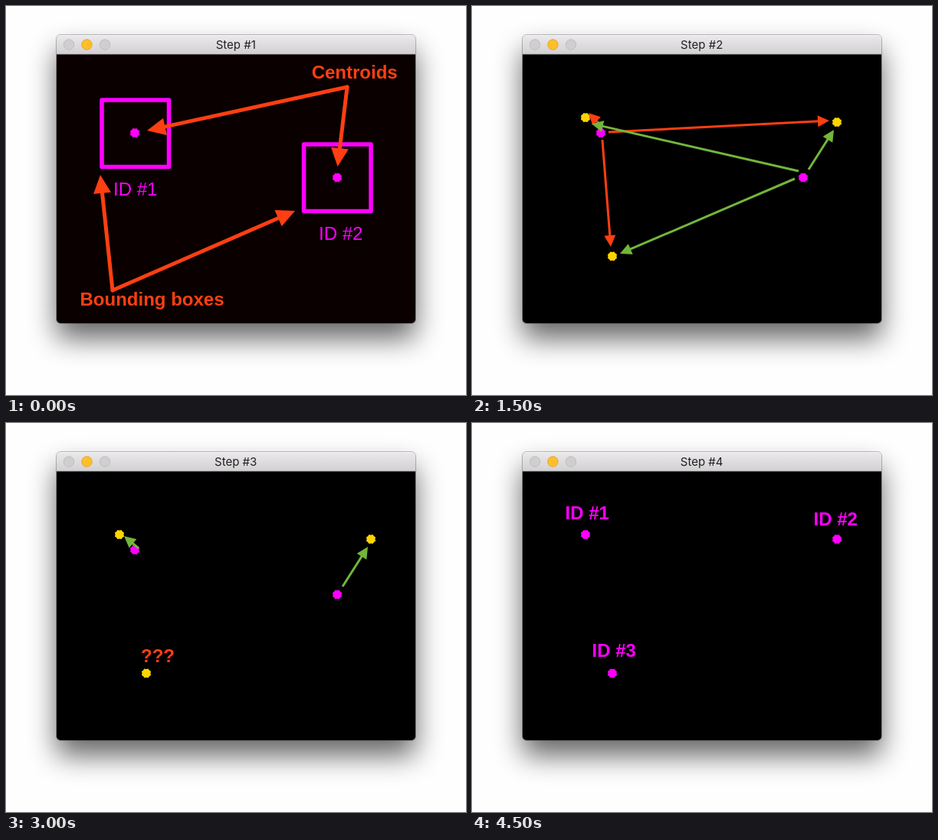
An HTML page for the animation above (6 s loop, 600 by 509 pixels).

```html
<!DOCTYPE html>
<html lang="en">
<head>
<meta charset="utf-8">
<title>Centroid tracking steps</title>
<style>
  html, body { margin: 0; width: 100%; height: 100%; overflow: hidden; background: #fefefe; }
  svg { display: block; width: 100vw; height: 100vh; }
  .title { font: 15px Inter, Roboto, sans-serif; fill: #222; text-anchor: middle; }
  .label { font: 24px "Liberation Sans", Arial, sans-serif; }
  .bold { font-weight: bold; }
</style>
</head>
<body>
<svg viewBox="0 0 600 509" xmlns="http://www.w3.org/2000/svg">
  <defs>
    <filter id="blur" x="-30%" y="-30%" width="160%" height="160%" color-interpolation-filters="sRGB">
      <feGaussianBlur stdDeviation="18"/>
    </filter>
    <linearGradient id="bar" x2="0" y2="1">
      <stop offset="0" stop-color="#ebe9eb"/>
      <stop offset="1" stop-color="#d2d0d2"/>
    </linearGradient>
  </defs>
  <rect width="600" height="509" fill="#fefefe"/>
  <rect x="66" y="58" width="468" height="377" rx="6" opacity=".6" filter="url(#blur)"/>
  <rect x="65.5" y="37.5" width="469" height="378" rx="5.5" fill="none" stroke="#000" stroke-opacity=".25"/>
  <path id="screen" d="M66 63H534V410a5 5 0 0 1-5 5H71a5 5 0 0 1-5-5Z"/>
  <path d="M66 63V43a5 5 0 0 1 5-5H529a5 5 0 0 1 5 5V63Z" fill="url(#bar)"/>
  <path d="M70 38.5H530" stroke="#f8f7f8"/>
  <path d="M66 63H534" stroke="#aaa8aa" stroke-width=".8"/>
  <g fill="#d0cfd0" stroke="#bbb9bb" stroke-width=".9">
    <circle cx="82" cy="50.5" r="6.7"/>
    <circle cx="105.5" cy="50.5" r="6.7" fill="#ffbf2b" stroke="#e2a122"/>
    <circle cx="129" cy="50.5" r="6.7"/>
  </g>
  <text id="title" class="title" x="299.7" y="56"></text>
  <g id="scene"></g>
</svg>
<script>
const STEP = 1500;
const MAGENTA = '#ff00ff', YELLOW = '#ffd500', RED = '#ff3f12', GREEN = '#72b63c';
const el = id => document.getElementById(id);

// Round marker with a slightly notched rim
function dot(x, y, color) {
  const pts = Array.from({ length: 16 }, (_, i) => {
    const a = (i + 1) * Math.PI / 8, r = i % 2 ? 5.5 : 6.5;
    return (x + r * Math.cos(a)).toFixed(2) + ',' + (y + r * Math.sin(a)).toFixed(2);
  });
  return `<polygon points="${pts.join(' ')}" fill="${color}"/>`;
}

function arrow(x1, y1, x2, y2, color, width = 3, len = 15, half = 7.5) {
  const d = Math.hypot(x2 - x1, y2 - y1), ux = (x2 - x1) / d, uy = (y2 - y1) / d;
  const bx = x2 - ux * len, by = y2 - uy * len;
  const head = `${x2},${y2} ${bx - uy * half},${by + ux * half} ${bx + uy * half},${by - ux * half}`;
  return `<path d="M${x1} ${y1}L${bx + ux} ${by + uy}" stroke="${color}" stroke-width="${width}" stroke-linecap="${width > 4 ? 'round' : 'butt'}"/>` +
    `<polygon points="${head}" fill="${color}"/>`;
}

const pointer = (x1, y1, x2, y2) => arrow(x1, y1, x2, y2, RED, 5, 24, 11.5);
const box = (x, y) =>
  `<rect x="${x}" y="${y}" width="87.5" height="87.5" fill="none" stroke="${MAGENTA}" stroke-width="5.6" stroke-linejoin="round"/>`;
const label = (x, y, text, color, bold = true) =>
  `<text class="label${bold ? ' bold' : ''}" x="${x}" y="${y}" fill="${color}">${text}</text>`;

const known = [[168, 166], [432, 224.5]];
const moved = [[148, 146], [476, 152], [183, 327.5]];
const dots = (points, color) => points.map(([x, y]) => dot(x, y, color)).join('');
const pairs = dots(known, MAGENTA) + dots(moved, YELLOW);
const match = arrow(439, 214, 472, 162, GREEN);

const scenes = [
  box(125, 123) + box(388.5, 181) + dots(known, MAGENTA) +
    label(140, 248, 'ID #1', MAGENTA, false) + label(408, 306, 'ID #2', MAGENTA, false) +
    pointer(445, 106, 184, 163) + pointer(445, 106, 432.5, 210) +
    pointer(139, 372, 123, 221) + pointer(139, 372, 377, 268) +
    label(398.7, 95, 'Centroids', RED) + label(96.5, 392, 'Bounding boxes', RED),

  pairs + arrow(178, 165, 466, 150, RED) + arrow(170, 175, 181, 315, RED) +
    arrow(169, 157, 152, 140, RED) + arrow(426, 216, 156, 154, GREEN) +
    arrow(421, 226, 193, 324, GREEN) + match,

  pairs + arrow(173, 164, 154, 148, GREEN) + match + label(176, 313, '???', RED),

  dots(moved, MAGENTA) + label(121.5, 126, 'ID #1', MAGENTA) +
    label(445.5, 134, 'ID #2', MAGENTA) + label(156.5, 306, 'ID #3', MAGENTA)
];

let shown = -1;
function draw(time) {
  const i = Math.floor(time / STEP) % scenes.length;
  if (i === shown) return;
  shown = i;
  el('title').textContent = 'Step #' + (i + 1);
  el('screen').setAttribute('fill', i ? '#000' : '#0a0000');
  el('scene').innerHTML = scenes[i];
}

const start = performance.now();
function tick(now) {
  draw(Math.max(0, now - start));
  requestAnimationFrame(tick);
}
draw(0);
requestAnimationFrame(tick);
</script>
</body>
</html>
```
